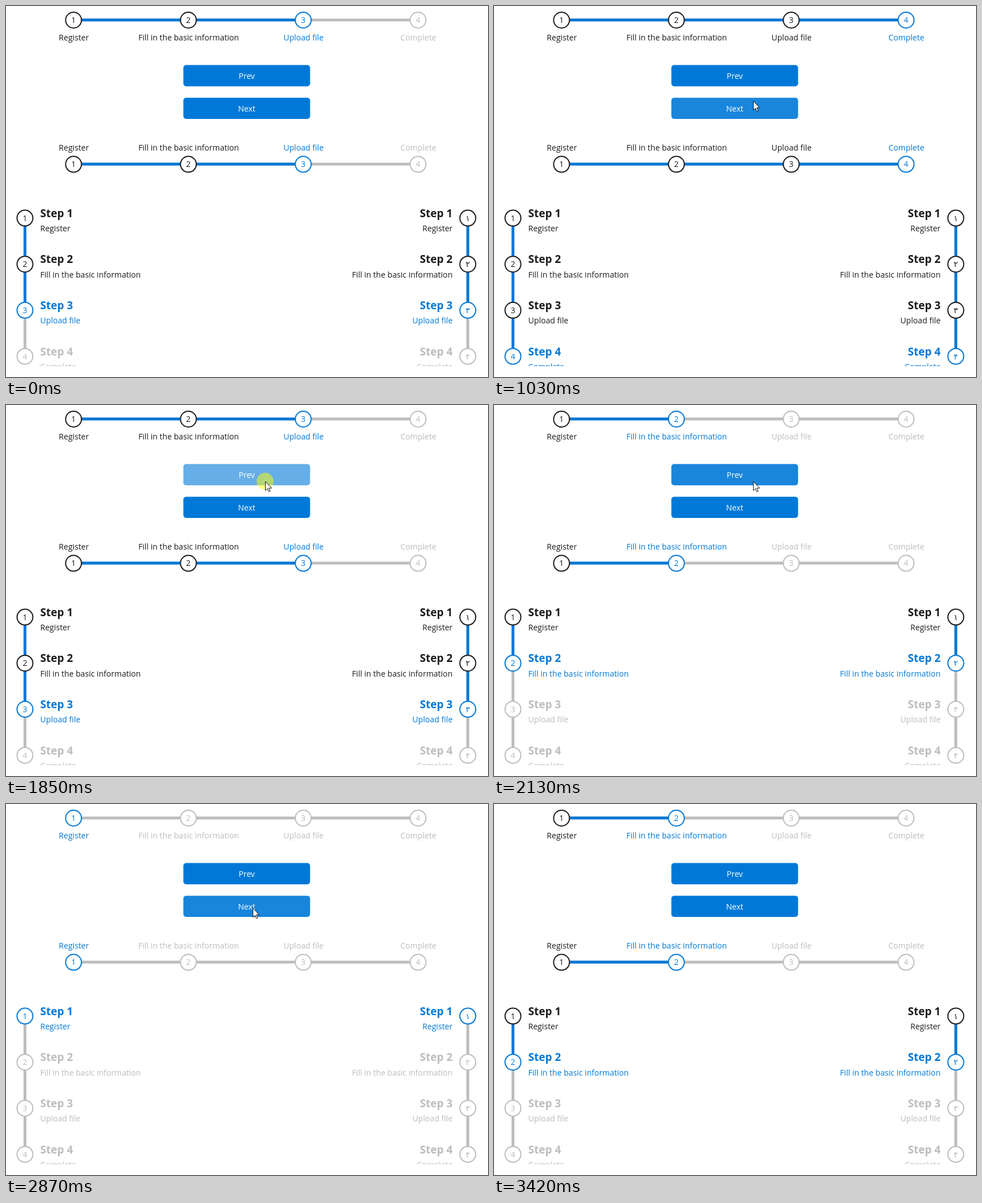
An HTML page that plays this animation: 852x657 px, repeating every 3770 ms.

```html
<!DOCTYPE html>
<html lang="en">
<head>
<meta charset="utf-8">
<title>Stepper</title>
<style>
html, body { margin: 0; width: 100%; height: 100%; overflow: hidden; background: #fff; }
svg { display: block; width: 852px; height: 657px; }
text { font: 14.1px "Open Sans", "DejaVu Sans", sans-serif; text-anchor: middle; fill: var(--c); }
text.title { font-size: 19px; font-weight: 700; }
text.start { text-anchor: start; }
text.end { text-anchor: end; }
circle.dot { fill: #fff; stroke: var(--c); stroke-width: 2; }
line { stroke-width: 5; stroke: #bdbdbd; }
line.fill { stroke: #0078d7; }
.done { --c: #1b1b1b; }
.active { --c: #0078d7; }
.todo { --c: #bdbdbd; }
.button { --c: #fff; }
</style>
</head>
<body>
<svg id="stage" viewBox="0 0 852 657">
  <clipPath id="view"><rect width="852" height="638"/></clipPath>
</svg>
<script>
const LOOP = 3770, TICK = 70;
const labels = ["Register", "Fill in the basic information", "Upload file", "Complete"];
const stage = document.getElementById("stage");

function add(parent, tag, attrs, text) {
  const el = document.createElementNS("http://www.w3.org/2000/svg", tag);
  for (const key in attrs) el.setAttribute(key, attrs[key]);
  if (text) el.textContent = text;
  parent.appendChild(el);
  return el;
}

const items = [[], [], [], []];
const fills = [];

// A track holds the rail, its blue fill and four step groups.
function addTrack(vertical, cross, start, gap, drawStep, digits = "1234") {
  const track = add(stage, "g", { "clip-path": "url(#view)" });
  const [along, across] = vertical ? ["y", "x"] : ["x", "y"];
  const rail = { [across + 1]: cross, [across + 2]: cross, [along + 1]: start, [along + 2]: start + 3 * gap };
  add(track, "line", rail);
  const fill = add(track, "line", { ...rail, class: "fill" });
  fills.push(step => fill.setAttribute(along + 2, start + step * gap));
  labels.forEach((label, i) => {
    const g = add(track, "g", {});
    const pos = start + i * gap;
    const [x, y] = vertical ? [cross, pos] : [pos, cross];
    add(g, "circle", { class: "dot", cx: x, cy: y + 0.3, r: 14 });
    add(g, "text", { x, y: y + 5.4 }, digits[i]);
    drawStep(g, label, i, x, y);
    items[i].push(g);
  });
}

const labelAt = dy => (g, label, i, x, y) => add(g, "text", { x: x + 0.5, y: y + dy }, label);
const sideText = (dx, side) => (g, label, i, x, y) => {
  add(g, "text", { x: x + dx, y: y - 1.5, class: "title " + side }, "Step " + (i + 1));
  add(g, "text", { x: x + dx, y: y + 23.7, class: side }, label);
};

addTrack(false, 24.7, 119.4, 203, labelAt(36.3));
addTrack(false, 280, 119.4, 203, labelAt(-24));
addTrack(true, 33.5, 375.3, 81.6, sideText(27, "start"));
addTrack(true, 816.3, 375.3, 81.6, sideText(-27, "end"), "۱۲۳۴");

function addButton(y, label) {
  const g = add(stage, "g", { class: "button" });
  const rect = add(g, "rect", { x: 313.5, y, width: 224, height: 37.6, rx: 5, fill: "#0078d7" });
  add(g, "text", { x: 425.5, y: y + 24.5 }, label);
  return { rect, y };
}
const buttons = [addButton(104.6, "Prev"), addButton(162.4, "Next")];

const pointer = add(stage, "g", {});
const halo = add(pointer, "circle", { r: 15, fill: "#ff0", opacity: 0.5 });
add(pointer, "path", {
  d: "M.5 .5V16.5L4.2 13 6.6 18.6 9 17.6 6.6 12.2H11.5Z",
  fill: "#fff", stroke: "#111", "stroke-width": 1
});

// press time, release time, step reached
const clicks = [[690, 830, 3], [1440, 1580, 2], [1850, 1990, 1], [2390, 2520, 0], [3000, 3140, 1]];
// time, x, y of the pointer after it has arrived at the buttons
const stops = [
  [560, 461, 194], [1030, 458, 168], [1100, 458, 150], [1170, 458, 136], [1240, 458, 135],
  [2800, 447, 160], [2870, 436, 184], [3350, 450, 626], [3420, -50, -50]
];

// CSS "ease": cubic-bezier(.25, .1, .25, 1)
function ease(x) {
  if (x >= 1) return 1;
  const bezier = (a, b, u) => 3 * a * u * (1 - u) ** 2 + 3 * b * u * u * (1 - u) + u ** 3;
  let lo = 0, hi = 1;
  for (let i = 0; i < 20; i++) {
    const mid = (lo + hi) / 2;
    if (bezier(0.25, 0.25, mid) < x) lo = mid; else hi = mid;
  }
  return bezier(0.1, 1, lo);
}

const snap = ms => Math.floor(ms / TICK) * TICK;

function pointerAt(t) {
  if (t < TICK) return [-50, -50];
  if (t < 560) {
    const left = (1 - snap(t - TICK) / 490) ** 1.5;
    return [461 + 277 * left, 194 + 354 * left];
  }
  return stops.filter(s => s[0] <= t).pop().slice(1);
}

function draw(t) {
  let step = 2, before = 2, since = -Infinity, pressed = false;
  for (const [down, up, to] of clicks) {
    if (t >= down && t < up) pressed = true;
    if (t >= up) { before = step; step = to; since = up; }
  }
  const moved = before === step ? 1 : ease((snap(t - since) + 20) / 200);
  fills.forEach(setFill => setFill(before + (step - before) * moved));
  items.forEach((groups, i) => groups.forEach(g =>
    g.setAttribute("class", i < step ? "done" : i > step ? "todo" : "active")));

  const [x, y] = pointerAt(t);
  pointer.setAttribute("transform", `translate(${Math.round(x)} ${Math.round(y)})`);
  halo.setAttribute("visibility", pressed ? "visible" : "hidden");
  for (const b of buttons) {
    const over = x > 313 && x < 538 && y >= b.y && y < b.y + 38;
    b.rect.setAttribute("opacity", over ? (pressed ? 0.6 : 0.9) : 1);
  }
}

const begin = performance.now();
function loop() {
  draw((performance.now() - begin) % LOOP);
  requestAnimationFrame(loop);
}
loop();
</script>
</body>
</html>
```
